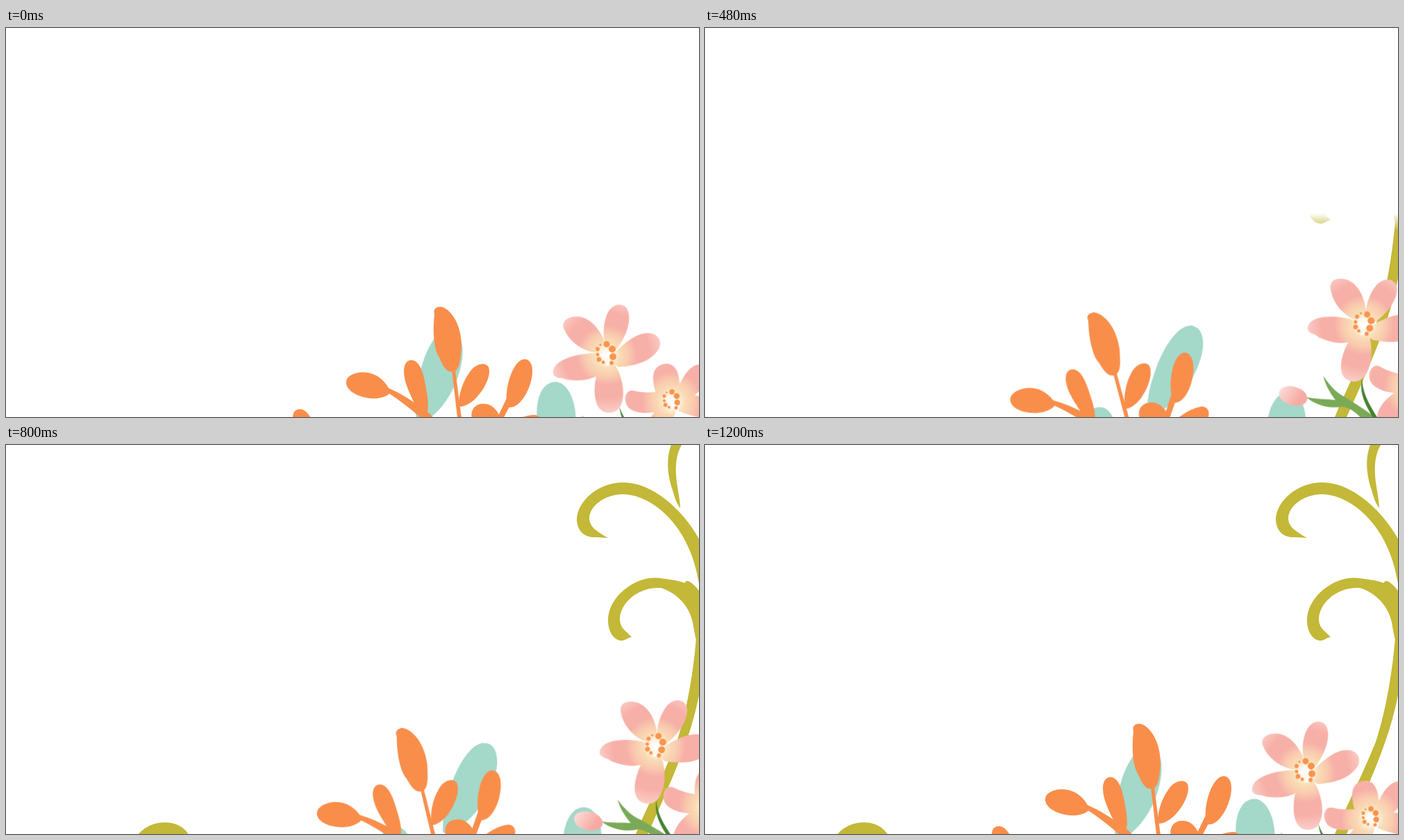
Recreate the animation shown at these times as an HTML page. Size 998 by 561 pixels, loop 1240 ms.

```html
<!DOCTYPE html>
<html lang="en">
<head>
<meta charset="utf-8">
<title>Swaying flowers</title>
<style>
  html, body { margin: 0; width: 100%; height: 100%; overflow: hidden; background: #fff; }
  svg { display: block; width: 100%; height: 100%; }

  /* The small negative delay keeps each 40 ms step clear of rounding. */
  .sway, .wipe { animation: 1240ms -2ms infinite; }

  .mint { fill: #a4d8c9; transform-origin: 708px 888px; animation-name: mint; }
  .twig { fill: #f98e4b; transform-origin: 652px 883px; animation-name: twig; }
  .bloom { transform-origin: 936px 432px; animation-name: bloom; }
  .vine { fill: #c3b838; }
  .rise { animation-name: rise; }
  .creep { animation-name: creep; }

  @keyframes mint {
    0%, 96.774%, 100% { transform: rotate(-4deg); animation-timing-function: steps(15); }
    48.387% { transform: rotate(6deg); animation-timing-function: steps(15); }
  }
  @keyframes twig {
    0%, 96.774%, 100% { transform: rotate(0deg); animation-timing-function: steps(15); }
    48.387% { transform: rotate(-10deg); animation-timing-function: steps(15); }
  }
  @keyframes bloom {
    0% { transform: translate(-72px, 37px) rotate(-13.5deg); animation-timing-function: steps(6); }
    19.355% { transform: translate(-27px, 14px) rotate(-5.33deg); animation-timing-function: steps(9); }
    48.387% { transform: translate(33px, -17px) rotate(6.67deg); animation-timing-function: steps(9); }
    77.419% { transform: translate(-27px, 14px) rotate(-5.33deg); animation-timing-function: steps(6); }
    96.774%, 100% { transform: translate(-72px, 37px) rotate(-13.5deg); }
  }
  @keyframes rise {
    0% { transform: translateY(747px); animation-timing-function: steps(20); }
    64.516%, 100% { transform: translateY(-53px); }
  }
  @keyframes creep {
    0% { transform: translateX(867px); animation-timing-function: steps(20); }
    64.516%, 100% { transform: translateX(67px); }
  }
</style>
</head>
<body>
<svg viewBox="0 0 998 561" preserveAspectRatio="none">
  <defs>
    <linearGradient id="fadeY" x2="0" y2="1">
      <stop stop-color="#fff" stop-opacity="0"/><stop offset=".021" stop-color="#fff"/>
    </linearGradient>
    <linearGradient id="fadeX">
      <stop stop-color="#fff" stop-opacity="0"/><stop offset=".021" stop-color="#fff"/>
    </linearGradient>
    <mask id="riseMask" maskUnits="userSpaceOnUse" x="0" y="0" width="998" height="561">
      <rect class="wipe rise" width="998" height="1200" fill="url(#fadeY)"/>
    </mask>
    <mask id="creepMask" maskUnits="userSpaceOnUse" x="0" y="0" width="998" height="561">
      <rect class="wipe creep" width="1200" height="561" fill="url(#fadeX)"/>
    </mask>

    <radialGradient id="petal" gradientUnits="userSpaceOnUse" cx="1" cy="3" r="86">
      <stop stop-color="#fff"/>
      <stop offset=".1" stop-color="#fff6ea"/>
      <stop offset=".22" stop-color="#fadcb6"/>
      <stop offset=".36" stop-color="#f9cbae"/>
      <stop offset=".5" stop-color="#f7b0a8"/>
      <stop offset=".72" stop-color="#f7b0a8"/>
      <stop offset="1" stop-color="#fad2cb"/>
    </radialGradient>
    <linearGradient id="bud" x1="0" y1=".4" x2="1" y2=".6">
      <stop stop-color="#fbdcd6"/><stop offset=".75" stop-color="#f7aaa4"/>
    </linearGradient>

    <g id="stamens" fill="#f9944c">
      <circle cx="1" cy="-13" r="4.5"/><circle cx="9" cy="-6" r="5"/><circle cx="10" cy="5" r="5"/>
      <circle cx="8" cy="14" r="3"/><circle cx="-4" cy="13" r="2.4"/><circle cx="-10" cy="9" r="3.5"/>
      <circle cx="-12" cy="2" r="2.5"/><circle cx="-12" cy="-6" r="3"/><circle cx="-8" cy="-12" r="1.6"/>
    </g>
  </defs>

  <g class="vine" mask="url(#riseMask)">
    <path d="M907 561C922 524 945 480 966 428C981 383 991 320 994 276L1000 268V350C989 415 963 475 924 561Z"/>
    <path d="M1000 213C994 204 986 196 980 196L977 199C965 194 945 193 943 192Q934 191 927 192C898 196 867 222 867 253C867 270 876 283 888 282C893 281 897 277 901 277L894 270C888 265 884 260 884 250C885 228 910 204 943 206C968 214 987 235 990 262L993 278L1000 290Z"/>
    <path d="M1000 139C975 92 930 54 889 54C852 54 822 82 822 108C823 126 835 134 850 133L867 134C850 124 840 118 840 105C841 88 862 71 889 71C930 72 985 115 998 200H1000Z"/>
    <path d="M958 0C950 20 953 45 960 65C963 77 967 86 971 91C971 75 963 50 965 28C966 15 969 7 973 0Z"/>
  </g>
  <path class="vine" mask="url(#creepMask)" d="M190 562C210 538 250 539 263 562Z"/>

  <g class="sway mint">
    <path d="M668 431C682 431 689 446 687 466C683 500 662 538 634 556C626 562 617 566 614 562C612 545 614 524 621 500C629 468 648 431 668 431Z"/>
    <path d="M787 570C787 535 800 517 816 517C832 517 844 540 843 570L835 650H795Z"/>
    <ellipse cx="543" cy="597" rx="26" ry="40" transform="rotate(8 543 597)"/>
  </g>

  <g class="sway twig">
    <path d="M617 412C614 405 622 400 630 403C650 413 659 445 655 470C654 485 651 496 642 496C633 496 628 485 624 475C617 466 615 445 616 425Z"/>
    <path d="M642 493L647 494L657 570L660 640H648L650 561Z"/>
    <path d="M554 525C548 534 530 536 518 533C500 529 489 520 490 510C491 500 507 495 520 497C536 499 548 511 554 525Z"/>
    <path d="M548 518C570 527 592 542 610 556L650 600V615C620 580 580 545 550 526Z"/>
    <path d="M573 495C573 484 578 478 585 479C597 481 602 500 605 520C608 535 609 550 606 556C600 560 594 553 590 545C583 530 573 512 573 495Z"/>
    <path d="M652 546C651 530 658 509 668 496C676 484 690 481 695 489C699 500 690 519 680 530C672 540 660 547 652 546Z"/>
    <path d="M724 547C718 540 721 515 727 500C733 484 742 475 750 478C760 482 760 500 754 516C748 533 736 549 724 547Z"/>
    <path d="M721 534L725 546L711 573L680 640L672 635L708 561Z"/>
    <path d="M671 563C668 549 678 541 688 542C699 542 706 549 711 560L708 590L695 600C680 590 673 576 671 563Z"/>
    <path d="M715 577C730 565 748 558 762 558C772 560 772 570 768 576C755 590 735 590 715 590Z"/>
    <path d="M413 562C413 551 420 549 426 550C434 552 442 564 446 580L435 590C422 582 414 573 413 562Z"/>
  </g>

  <g class="sway bloom">
    <path fill="#7aaa57" d="M881 511C894 529 906 537 914 540C927 548 937 553 952 563L985 590H955C940 567 925 556 911 554C889 559 870 552 858 543C873 545 888 544 900 545C890 533 884 522 881 511Z"/>
    <path fill="#43812f" d="M937 512C938 530 946 545 962 568L955 567C940 545 934 530 937 512Z"/>
    <ellipse cx="839" cy="542" rx="21" ry="13.5" transform="rotate(14 839 542)" fill="url(#bud)"/>

    <g fill="url(#petal)" transform="translate(1012 519) rotate(13.5)">
      <path d="M-20-11C-36-9-46-11-56-13C-64-14-68-5-66 3C-64 14-54 18-42 19C-34 20-28 18-20 18L0 8Z"/>
      <path d="M-22-8C-26-20-28-34-24-42C-18-53-2-55 5-46C10-40 11-32 12-22L0 4Z"/>
      <path d="M10-18C18-36 28-51 42-51C58-50 58-36 48-22C40-10 30-2 18 2L0 4Z"/>
      <path d="M-22 16C-34 28-44 50-36 64C-24 72-8 60 6 18L0 0Z"/>
      <path d="M16-4C40-10 62 0 64 14C62 30 36 28 10 16Z"/>
      <use href="#stamens" transform="scale(.85)"/>
    </g>

    <g fill="url(#petal)" transform="translate(936 432) rotate(13.5)">
      <path d="M-2-18C-6-38 0-70 19-70C40-70 38-34 14-4L-4 0Z"/>
      <path d="M16-4C30-18 46-29 60-29C76-29 82-16 76-6C66 10 46 18 18 20L0 8Z"/>
      <path d="M-10 20C-20 46-20 86 4 86C28 86 27 54 22 38C20 28 16 22 12 15Z"/>
      <path d="M-14 0C-34 0-52 4-64 11C-77 18-78 29-74 33C-69 37-62 35-57 38C-42 40-24 40-10 31L6 8Z"/>
      <path d="M-4-22C-12-39-26-53-42-53C-58-53-65-44-60-34C-52-16-34-4-16-1L4 4Z"/>
      <use href="#stamens"/>
    </g>
  </g>
</svg>
</body>
</html>
```
